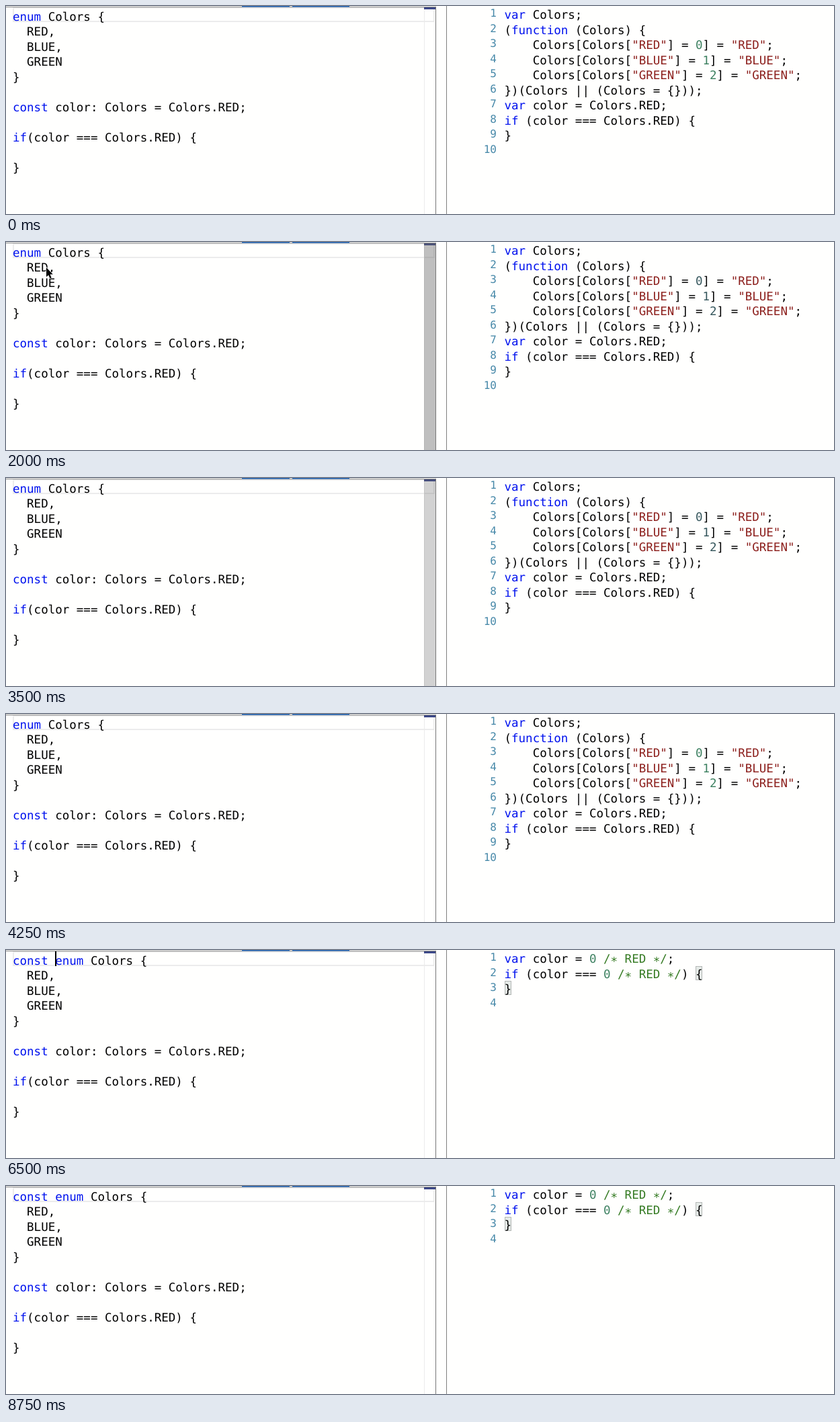
Animation, 1232 px wide and 310 px high, one loop 9500 ms. Source, as an HTML page:

```html
<!DOCTYPE html>
<html lang="en">
<head>
<meta charset="utf-8">
<title>Enum compile demo</title>
<style>
  html, body { margin: 0; width: 100%; height: 100%; overflow: hidden; background: #fffffe; }
  svg { display: block; }
  text { white-space: pre; text-rendering: geometricPrecision; }
  .code text { font: 17.5px "DejaVu Sans Mono", monospace; fill: #000; }
  .code .kw { fill: #0012ee; }
  .code .str { fill: #8c1f1c; }
  .code .num { fill: #3c8060; }
  .code .com { fill: #347a22; }
  .dim .num { fill: #35565c; }
  .code .line { font-size: 16px; fill: #4688a8; text-anchor: end; }
  .match { fill: #e6ebe8; stroke: #b4b8b6; }
  .tip text { font: 16.5px Inter, sans-serif; fill: #4c4c4c; }
</style>
</head>
<body>
<svg width="1232" height="310" viewBox="0 0 1232 310">
  <rect width="1232" height="310" fill="#fffffe"/>
  <rect x="11" y="3" width="626" height="20" fill="none" stroke="#ececec" stroke-width="2"/>
  <rect x="622" y="2" width="1" height="308" fill="#ebebeb"/>
  <rect id="shade" x="10" y="24" width="285" height="23" fill="#f7f7f8"/>
  <g id="left" class="code"></g>
  <g id="right" class="code"></g>
  <rect id="caret" y="2" width="2" height="22"/>
  <rect x="622" y="2" width="17" height="3" fill="#3c4888"/>
  <rect id="bar" x="622" y="2" width="18" height="308" fill="#646464"/>
  <rect y="1" width="640" height="1" fill="#858585"/>
  <path d="M351 0h71v1.5h-71zM426 0h85v1.5h-85z" fill="#2d6fc0"/>
  <rect x="639" y="1" width="1" height="309" fill="#777"/>
  <rect x="655" width="1" height="310" fill="#808080"/>
  <g id="tip" class="tip">
    <rect x="30.5" y="-4.5" width="264" height="31" fill="#f3f3f3" stroke="#c8c8c8"/>
    <text x="38" y="13">(enum member) Colors.RED = 0</text>
  </g>
  <path id="mouse" d="M0 0V14L3.2 11.2 5.4 16.2 7.7 15.2 5.5 10.3H9.8Z" stroke="#fff" stroke-width="1.4" paint-order="stroke"/>
</svg>
<script>
const LOOP = 9500, CHAR = 17.5 * 0.60205, ROW = 22.5;
const $ = id => document.getElementById(id);
const TOKEN = /(\/\*|\*\/)|("[^"]*")|\b(enum|const|if|var|function)\b|\b(\d)\b/g;

const esc = s => String(s).replace(/&/g, '&amp;').replace(/</g, '&lt;');
const put = (s, x, y, cls = '') => `<text class="${cls}" x="${x}" y="${y}">${esc(s)}</text>`;

// Colours one line of code; comment stars sit lower than the font draws them
function codeLine(src, x0, y) {
  const at = col => (x0 + col * CHAR).toFixed(2);
  let out = '', pos = 0, inComment = false;
  const plain = end => {
    if (end > pos) out += put(src.slice(pos, end), at(pos), y, inComment ? 'com' : '');
  };
  for (const m of src.matchAll(TOKEN)) {
    plain(m.index);
    if (m[1]) {
      [...m[1]].forEach((c, i) => out += put(c, at(m.index + i), c === '*' ? y + 4 : y, 'com'));
      inComment = m[1] === '/*';
    } else {
      out += put(m[0], at(m.index), y, m[2] ? 'str' : m[3] ? 'kw' : 'num');
    }
    pos = m.index + m[0].length;
  }
  plain(src.length);
  return out;
}

const BODY = ['  RED,', '  BLUE,', '  GREEN', '}', '', 'const color: Colors = Colors.RED;',
  '', 'if(color === Colors.RED) {', '', '}'];
const member = (name, i) => `    Colors[Colors["${name}"] = ${i}] = "${name}";`;
const USE = ['var color = Colors.RED;', 'if (color === Colors.RED) {', '}', ''];

// Compiled output, with [column, row] of highlighted brackets
const FULL = {
  lines: ['var Colors;', '(function (Colors) {', ...['RED', 'BLUE', 'GREEN'].map(member),
    '})(Colors || (Colors = {}));', ...USE],
  match: []
};
const BROKEN = {
  lines: ['consenum;', 'Colors;', '{', '    RED,', '        BLUE,', '        GREEN;', '}', ...USE],
  match: [[0, 2], [0, 6]]
};
const INLINE = {
  lines: ['var color = 0 /* RED */;', 'if (color === 0 /* RED */) {', '}', ''],
  match: [[27, 1], [0, 2]]
};

function drawLeft(typed) {
  $('left').innerHTML = [typed + 'enum Colors {', ...BODY]
    .map((s, i) => codeLine(s, 10, Math.floor(22 + i * ROW))).join('');
}
function drawRight({ lines, match }) {
  const boxes = match.map(([c, r]) =>
    `<rect class="match" x="${Math.round(741.5 + c * CHAR) + .5}" y="${Math.floor(1.5 + r * ROW) + .5}" width="9" height="20"/>`);
  const rows = lines.map((s, i) =>
    put(i + 1, 730, Math.round(16 + i * ROW), 'line') + codeLine(s, 741.5, Math.round(19 + i * ROW)));
  $('right').innerHTML = boxes.join('') + rows.join('');
}

// [time, pointer x, y, scrollbar, tooltip]
const HOVER = [
  [0, -40, 0, 0, 0],
  [750, 400, 296, 1, 0], [1000, 332, 274, 1, 0], [1250, 271, 246, 1, 0], [1500, 182, 162, 1, 0],
  [1750, 102, 82, 1, 0], [2000, 60, 38, 1, 0], [2250, 53, 30, 1, 0], [2500, 52, 28, 1, 1],
  [2750, 52, 28, 1, 1], [3000, 4, 52, 1, 1], [3250, -40, 0, .9, 0], [3500, -40, 0, .7, 0],
  [3750, -40, 0, .45, 0], [4000, -40, 0, .2, 0], [4250, -40, 0, 0, 0]
];
// [time, typed text, output]
const TYPING = [
  [0, '', FULL], [4750, 'co', FULL], [5000, 'cons', FULL], [5250, 'const', BROKEN], [5500, 'const ', INLINE]
];
const last = (rows, t) => rows.filter(r => r[0] <= t).pop();

function caretOn(t) {
  if (t < 4750 || t >= 8750) return false;
  return t < 5500 || Math.floor((t - 5500) / 500) % 2 === 0;
}

let shown;
function draw(t) {
  const typing = last(TYPING, t), [, typed, output] = typing;
  if (typing !== shown) {
    drawLeft(typed);
    drawRight(output);
    shown = typing;
  }
  const [, x, y, bar, tip] = last(HOVER, t);
  $('mouse').setAttribute('transform', `translate(${x} ${y})`);
  $('bar').setAttribute('opacity', bar * .41);
  $('tip').setAttribute('opacity', tip);
  $('shade').setAttribute('opacity', tip);
  $('right').classList.toggle('dim', bar > .5);
  $('caret').setAttribute('x', Math.round(10 + typed.length * CHAR));
  $('caret').setAttribute('opacity', +caretOn(t));
}

const start = performance.now();
function tick() {
  draw(Math.max(0, performance.now() - start) % LOOP);
  requestAnimationFrame(tick);
}
tick();
</script>
</body>
</html>
```
